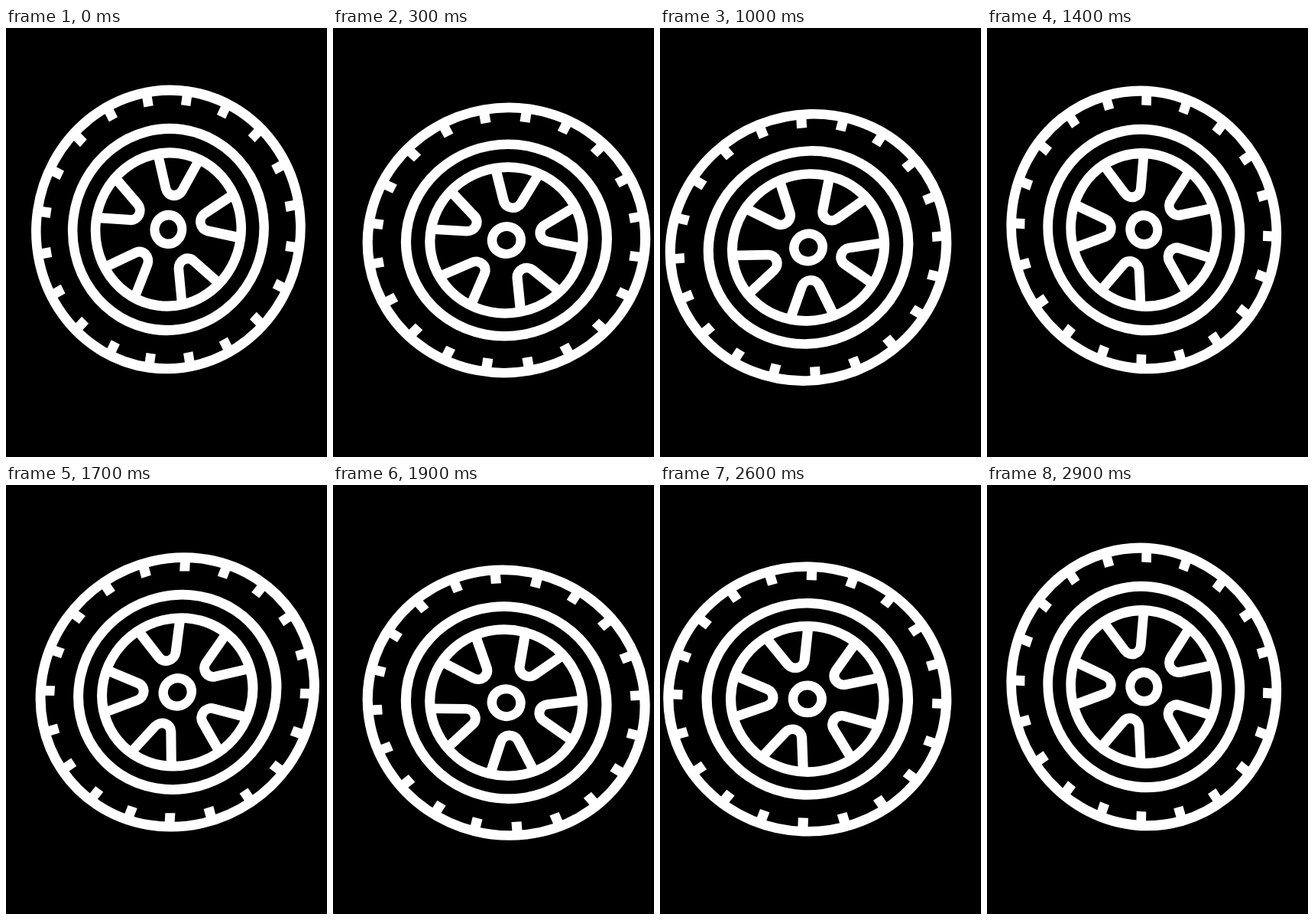
Animation of 420 by 560 pixels, one loop 3000 ms. Source, as an HTML page:

```html
<!DOCTYPE html>
<html lang="en">
<head>
<meta charset="utf-8">
<title>Rolling wheel</title>
<style>
  html, body { margin: 0; width: 100%; height: 100%; overflow: hidden; background: #000; }
  svg { display: block; width: 100%; height: 100%; }
</style>
</head>
<body>
<svg viewBox="0 0 420 560">
  <rect width="420" height="560" fill="#000"/>
  <g id="wheel" fill="none" stroke="#fff"></g>
</svg>
<script>
const UNIT = 12.57;       // grid of the wheel; its outer radius is 15 units
const WEIGHT = 13.2;      // line weight of rings, ticks and spokes
const TICKS = 20, SPOKES = 5;
const STEP = 100, TURN = 24, START = 8;
const SPOKE = 'M-29.3 -97L-11.4 -52.6A12.3 12.3 0 0 0 11.4 -52.6L29.3 -97';

const wheel = document.getElementById('wheel');
wheel.setAttribute('stroke-width', WEIGHT);

function add(tag, attrs) {
  const el = document.createElementNS('http://www.w3.org/2000/svg', tag);
  for (const key in attrs) el.setAttribute(key, attrs[key]);
  wheel.append(el);
}

function ring(outer, weight) {
  add('circle', { r: outer * UNIT - weight / 2, 'stroke-width': weight });
}

function repeat(count, d) {
  for (let i = 0; i < count; i++) {
    add('path', { d, transform: `rotate(${i * 360 / count})` });
  }
}

for (const outer of [15, 11, 8.5]) ring(outer, WEIGHT);
ring(2, UNIT);
repeat(TICKS, `M0 ${-14.5 * UNIT}V${-13 * UNIT}`);
repeat(SPOKES, SPOKE);

// The slightly tall wheel turns about the stage centre, just below its hub.
function draw(ms) {
  const angle = (START + TURN * Math.floor((ms + 0.5) / STEP)) % 360;
  wheel.setAttribute('transform',
    `translate(210 280) rotate(${angle}) translate(0 -17.2) scale(.95 1)`);
}

function tick() {
  draw(performance.now() % 3000);
  requestAnimationFrame(tick);
}

draw(0);
requestAnimationFrame(tick);
</script>
</body>
</html>
```
